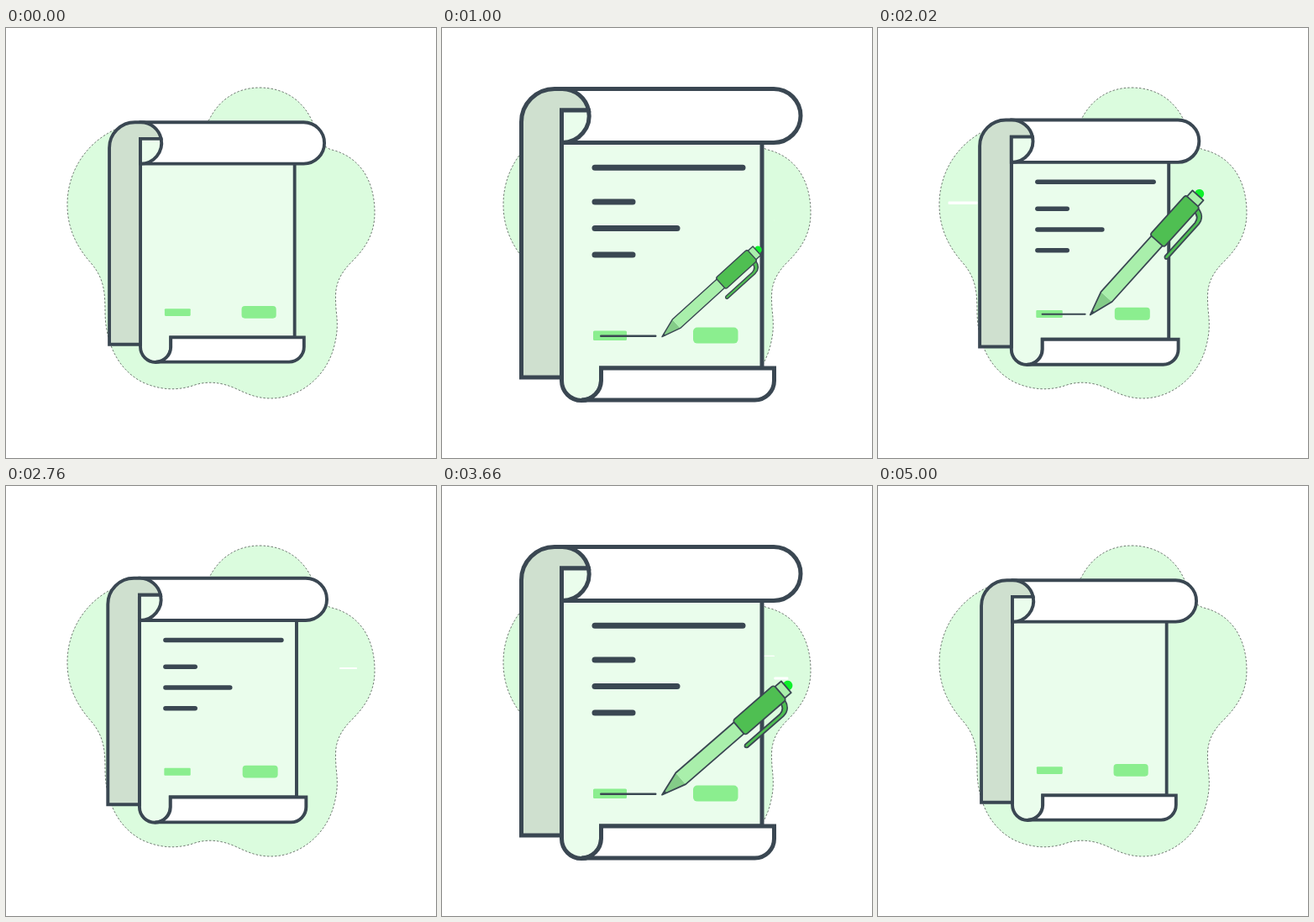
An HTML page that plays this animation: 512x512 px, repeating every 5.04 s.

```html
<!DOCTYPE html>
<html lang="en">
<head>
<meta charset="utf-8">
<title>Signing a scroll</title>
<style>
html, body { margin: 0; height: 100%; overflow: hidden; background: #fff; }
svg { display: block; width: 100vw; height: 100vh; }

.ink { stroke: #3a4752; stroke-width: 5; }
.mint { fill: #eafdec; }
.shade { fill: #cfe0cf; }
.white { fill: #fff; }
.tag { fill: #8bee8f; }

#scroll, #pen, #sign, .streak { animation: 2520ms linear infinite; }

/* Scroll breathing */
#scroll { transform-origin: 218.7px 245.5px; animation-name: breathe; }
@keyframes breathe {
  0%, 5.16% { scale: .77; animation-timing-function: cubic-bezier(.364, 0, .636, 1); }
  32.74%, 57.74% { scale: 1; animation-timing-function: cubic-bezier(.364, 0, .636, 1); }
  84.72%, 100% { scale: .77; }
}

/* Text lines: drawn one after another, wiped with a wind-up */
.line {
  x: 178.5px; rx: 3.5px; fill: #3a4752;
  transform-box: fill-box; transform: translateY(-50%);
  animation: write 5040ms infinite both, thicken 5040ms infinite both;
  animation-delay: calc(var(--i) * 115ms);
}
@keyframes write {
  0%, 4.27% { width: 0; animation-timing-function: cubic-bezier(.215, .61, .355, 1); }
  11.41%, 77.44% { width: var(--w); animation-timing-function: cubic-bezier(.333, 0, .667, -1.1); }
  85.38%, 100% { width: 0; }
}
@keyframes thicken {
  0%, 4.27% { height: 1px; animation-timing-function: cubic-bezier(.215, .61, .355, 1); }
  11.41%, 82.68% { height: 7px; animation-timing-function: linear; }
  85.38%, 100% { height: .8px; }
}

/* Signature */
#sign { x: 188px; y: 365.5px; height: 2.4px; rx: 1.2px; fill: #3a4752; animation-name: sign; }
@keyframes sign {
  0%, 17.46% { width: 0; }
  25.79%, 94.4% { width: 67.5px; }
  98%, 100% { width: 0; }
}

/* Pen: its tip is the origin, its axis runs along +x */
#pen {
  stroke: #3a4752; stroke-width: 2.2; stroke-linejoin: round;
  animation-name: travel, grow, tilt;
}
@keyframes travel {
  0%, 23.81% { translate: 237px 367.7px; }
  28%, 100% { translate: 262px 367.7px; }
}
@keyframes grow {
  0%, 20.24% { scale: 0; }
  50.79% { scale: 1; }
  74.6%, 85.32% { scale: 1.02; }
  98%, 100% { scale: 0; }
}
@keyframes tilt {
  0%, 23.81% { rotate: -50deg; animation-timing-function: ease-in-out; }
  45.24% { rotate: -41deg; animation-timing-function: ease-in-out; }
  59.52% { rotate: -61deg; animation-timing-function: ease-in-out; }
  74.6% { rotate: -47.5deg; animation-timing-function: ease-in-out; }
  93.65%, 100% { rotate: -50deg; }
}

/* White streaks on the backdrop */
.streak { fill: #fff; height: 3px; rx: 1px; }
#s1 { animation-name: s1; }
#s2 { animation-name: s2; }
#s3 { animation-name: s3; }
#s4 { animation-name: s4; height: 3.5px; }
@keyframes s1 {
  0%, 2.38% { x: 397px; width: 0; height: 1.5px; }
  7.14% { x: 397px; width: 17px; }
  9.52% { x: 397px; width: 21px; height: 2px; }
  23.81% { x: 407px; width: 35px; height: 3px; }
  39.68% { x: 480px; width: 18px; }
  41%, 100% { x: 498px; width: 0; }
}
@keyframes s2 {
  0%, 39.68% { x: 395px; width: 0; }
  45.24% { x: 395px; width: 17px; }
  49.6% { x: 437px; width: 17px; }
  51.2%, 100% { x: 454px; width: 0; }
}
@keyframes s3 {
  0%, 42.86% { x: 383px; width: 0; height: 1px; }
  45.24% { x: 383px; width: 13px; height: 1.2px; }
  59.52% { x: 387px; width: 40px; height: 3.5px; }
  65% { x: 415px; width: 15px; }
  68.25%, 100% { x: 430px; width: 0; }
}
@keyframes s4 {
  0%, 61.1% { x: 109px; width: 0; }
  65.08%, 74.6% { x: 75px; width: 34px; }
  85.7% { x: 92px; width: 36px; }
  92.86% { x: 111px; width: 20px; }
  96.8%, 100% { x: 128px; width: 0; }
}
</style>
</head>
<body>
<svg viewBox="0 0 512 512" fill="none">
  <path fill="#dbfcde" stroke="#3c443e" stroke-width=".7" stroke-dasharray="2.5 2"
    d="M302 71C331 71 354 86 365 112C373 130 376 142 388 145C420 153 439 180 439 220C439 245 428 262 412 278
       C390 300 392 315 393 335C395 352 395 362 391 378C382 415 350 441 315 441C298 441 286 435 275 430
       C256 421 238 420 222 426C203 432 183 431 163 422C135 408 119 378 118 340C118 315 117 300 103 282
       C85 262 73 240 73 210C73 165 103 125 150 114C190 105 225 130 242 109C254 85 275 71 302 71Z"/>

  <rect class="streak" id="s1" y="216"/>
  <rect class="streak" id="s2" y="227.5"/>
  <rect class="streak" id="s3" y="201.8"/>
  <rect class="streak" id="s4" y="206.5"/>

  <g id="scroll">
    <g class="ink">
      <path class="mint" d="M381 136.5V405H189.5V420A23.5 23.5 0 0 1 142.5 420V136.5"/>
      <path class="white" d="M189.5 405H395.5V420A23 23 0 0 1 372.5 443H166A23.5 23.5 0 0 0 189.5 420Z"/>
      <path class="white" d="M143 72.5H395A32 32 0 0 1 395 136.5H143Z"/>
      <path class="shade" d="M142.5 416H94.5V112A39.5 39.5 0 0 1 134 72.5H143A32 32 0 0 1 174.5 98H142.5Z"/>
      <path class="mint" d="M142.5 98H174.5A32 32 0 0 1 142.5 136.5Z"/>
    </g>

    <rect class="line" y="166.3" style="--i:0; --w:183px"/>
    <rect class="line" y="207" style="--i:1; --w:52px"/>
    <rect class="line" y="238.5" style="--i:2; --w:105px"/>
    <rect class="line" y="270" style="--i:3; --w:52px"/>

    <rect class="tag" x="180" y="360.6" width="40" height="11.5" rx="1.5"/>
    <rect class="tag" x="299" y="356.6" width="53.5" height="19" rx="5"/>
    <rect id="sign"/>

    <g id="pen">
      <circle cx="242" r="7" fill="#0df02a" stroke="none"/>
      <path fill="#4fbf52" d="M225 12C224 22 218 29 208 29.5H139Q134 27 139 24H206C213 23 217 19 217 12Z"/>
      <path fill="#84cc88" stroke="none" d="M0 0L36-11V11Z"/>
      <path fill="#a9efab" stroke="none" d="M36-11H150V11H36Z"/>
      <path d="M150-11H36L0 0L36 11H150"/>
      <path fill="#3a4752" stroke="none" d="M0 0L7-2.5V2.5Z"/>
      <rect fill="#a9efab" x="224" y="-11" width="15" height="22"/>
      <rect fill="#4fbf52" x="148" y="-14" width="79" height="28" rx="4"/>
    </g>
  </g>
</svg>
</body>
</html>
```
